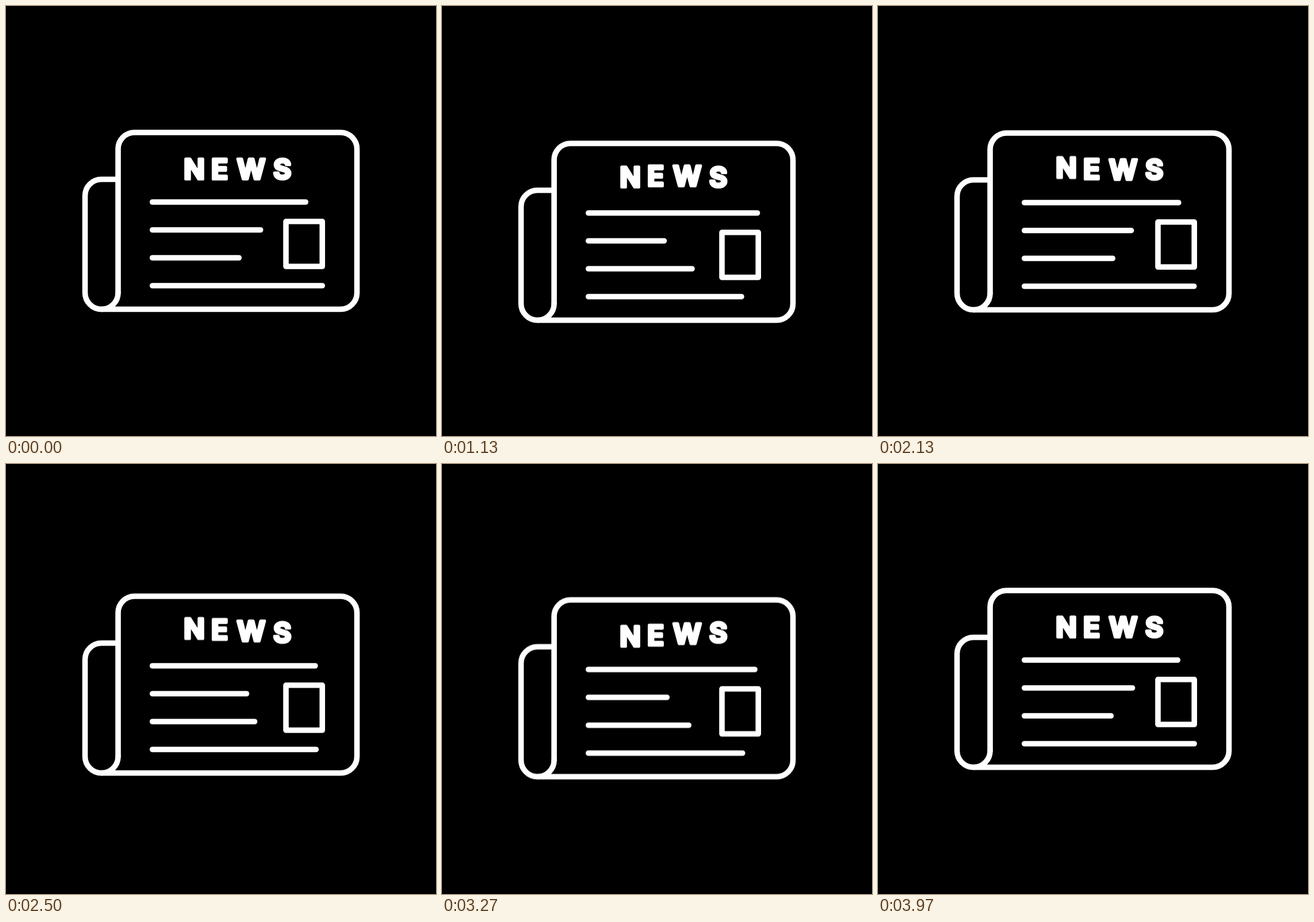
Animation, 748 px wide and 748 px high, one loop 4000 ms. Source, as an HTML page without scripts:

```html
<!DOCTYPE html>
<html lang="en">
<head>
<meta charset="utf-8">
<title>News</title>
<style>
  html, body { margin: 0; width: 100%; height: 100%; overflow: hidden; background: #000; }
  svg { display: block; width: 100vw; height: 100vh; }

  .paper {
    --ease: cubic-bezier(.333, 0, .667, 1);
    fill: none;
    stroke: #fff;
    stroke-width: 9.6;
    stroke-linecap: round;
    stroke-linejoin: round;
    animation: float 1s var(--ease) infinite alternate;
  }
  @keyframes float { to { transform: translateY(20px); } }

  /* each rule shows 400 minus the offset */
  .rule {
    stroke-dasharray: 400;
    animation: 2s var(--ease) infinite;
  }
  .r1 { animation-name: r1; }
  .r2 { animation-name: r2; }
  .r3 { animation-name: r3; }
  .r4 { animation-name: r4; }
  @keyframes r1 { 0%, 100% { stroke-dashoffset: 133.5px; } 46.7% { stroke-dashoffset: 103.5px; } }
  @keyframes r2 { 0%, 100% { stroke-dashoffset: 212px; } 55.3% { stroke-dashoffset: 268.5px; } }
  @keyframes r3 { 0%, 100% { stroke-dashoffset: 249.5px; } 38.3% { stroke-dashoffset: 211.8px; } }
  @keyframes r4 { 0%, 2.5%, 100% { stroke-dashoffset: 104.5px; } 57% { stroke-dashoffset: 133.8px; } }

  .title {
    font: 600 48px Inter, "DejaVu Sans", sans-serif;
    text-anchor: middle;
    fill: #fff;
    stroke-width: 5.2;
  }
  .title text {
    animation: hop 4s var(--ease) calc(var(--i) * .2s) infinite;
  }
  @keyframes hop {
    0%, .8%, 40.8%, 43.8%, 83.8%, 100% { transform: translateY(0); }
    20.8%, 63.8% { transform: translateY(-7.5px); }
  }
</style>
</head>
<body>
<svg viewBox="0 0 748 748">
  <g class="paper">
    <path d="M195 498.8V248.5A28.5 28.5 0 0 1 223.5 220H582A28.5 28.5 0 0 1 610.5 248.5V499A28.5 28.5 0 0 1 582 527.5H166.2A28.7 28.7 0 0 1 137.5 498.8V330A28.5 28.5 0 0 1 166 301.5H195"/>
    <path d="M195 498.8A28.7 28.7 0 0 1 166.2 527.5"/>
    <rect x="487" y="374.8" width="63.2" height="78.2"/>
    <path class="rule r1" d="M254.7 341H560"/>
    <path class="rule r2" d="M254.7 389.5H560"/>
    <path class="rule r3" d="M254.7 438H560"/>
    <path class="rule r4" d="M254.7 486.5H560"/>
    <g class="title">
      <text x="327.5" y="301.4" style="--i:0">N</text>
      <text x="371.5" y="301.4" style="--i:1">E</text>
      <text x="426.5" y="301.4" style="--i:2">W</text>
      <text x="480.5" y="301.4" style="--i:3">S</text>
    </g>
  </g>
</svg>
</body>
</html>
```
